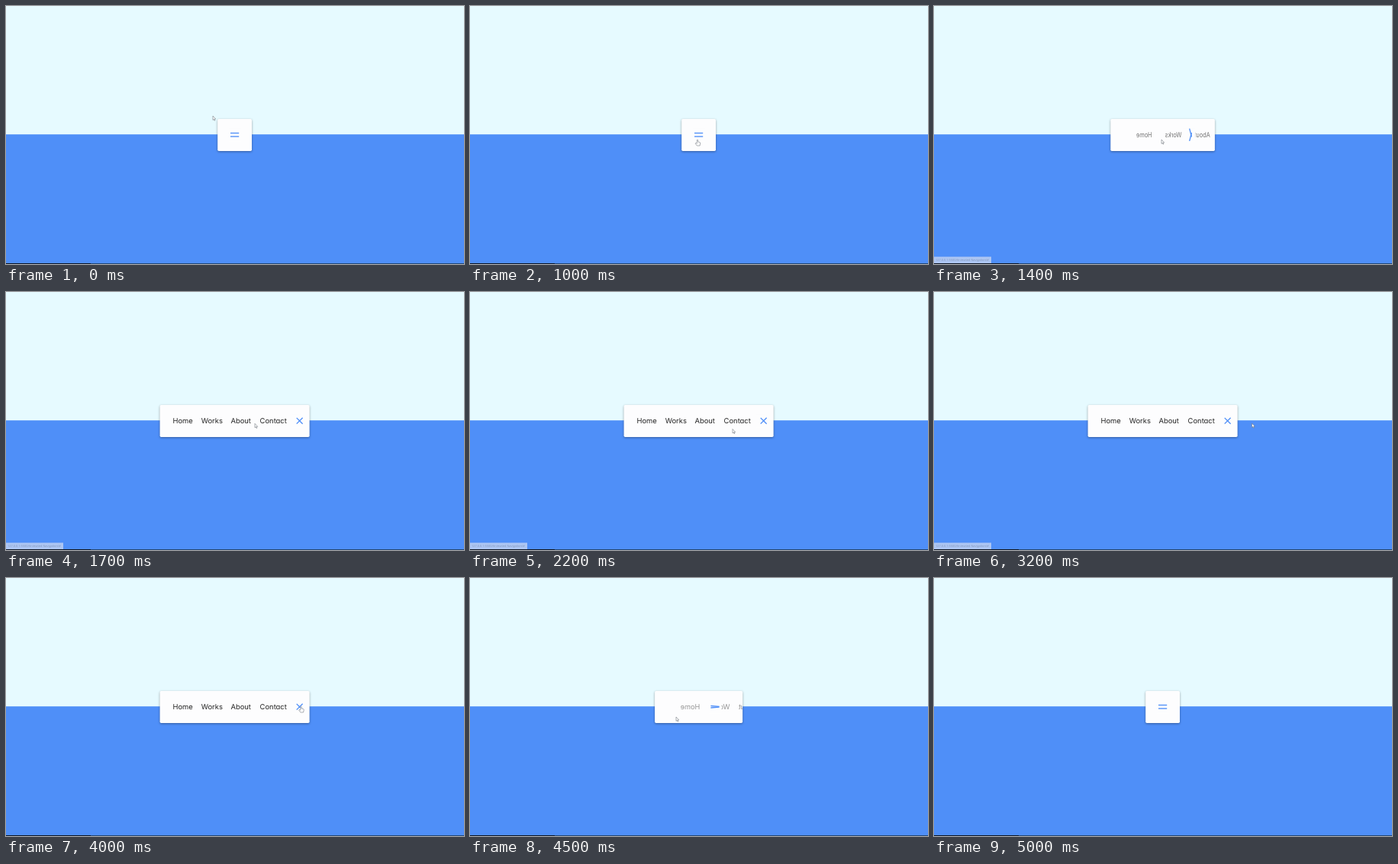
Recreate the animation shown at these times as an HTML page. Size 600x338 px, loop 6400 ms.

```html
<!DOCTYPE html>
<html lang="en">
<head>
<meta charset="utf-8">
<title>Animated navigation</title>
<style>
  html, body { margin: 0; width: 100%; height: 100%; overflow: hidden; background: #4f8ff8; }
  svg { display: block; width: 100vw; height: 100vh; }
  #panel { filter: drop-shadow(0 1.1px 1.4px rgba(0, 0, 0, .36)); }
  text { text-rendering: geometricPrecision; }
  #links text {
    font: 9.4px Inter, "Open Sans", sans-serif;
    font-feature-settings: "cv11";
    text-anchor: middle;
    fill: #222;
  }
  #status text { font: 3.9px "Open Sans", sans-serif; fill: #7f94b8; }
  #cursor path { fill: #fff; stroke: #6a6f78; stroke-width: .55; stroke-linejoin: round; }
</style>
</head>
<body>
<svg viewBox="0 0 600 338">
  <defs><clipPath id="clip"><rect id="clipBox" y="148" height="42" rx="1.7"/></clipPath></defs>
  <rect width="600" height="338" fill="#e6faff"/>
  <rect y="168.2" width="600" height="169.8" fill="#4f8ff8"/>
  <rect y="337" width="600" height="1" fill="#234673"/>
  <rect y="337" width="111" height="1" fill="#0d1420"/>
  <g id="status">
    <rect y="328.5" width="75" height="8.5" fill="#adc6f3"/>
    <text x="2" y="334.3">127.0.0.1:5500/Animated Navigation/#</text>
  </g>
  <rect id="panel" y="148" height="42" rx="1.7" fill="#fdfdfe"/>
  <g clip-path="url(#clip)">
    <g id="links"></g>
    <rect id="iconBack" y="160.3" height="16.9" fill="#fdfdfe"/>
    <rect class="line" x="-5.6" y="-.67" width="11.2" height="1.34" fill="#4f8ff8"/>
    <rect class="line" x="-5.6" y="-.67" width="11.2" height="1.34" fill="#4f8ff8"/>
  </g>
  <g id="cursor">
    <path id="arrow" d="M0 0V5.4L1.3 4.3L2.1 6.2L2.9 5.8L2.1 4H3.7Z"/>
    <path id="hand" d="M-.7 .6Q0 -.3 .7 .6V3L3 3.5Q3.9 3.8 3.7 5L3.1 8H-.7L-2.8 5.2Q-2.7 4.2 -1.7 4.6L-.7 5.2Z"/>
  </g>
</svg>
<script>
const LOOP = 6400, STEP = 100;
const OPEN_AT = 1060, CLOSE_AT = 4200, TOGGLE = 560;
const HOVER_DELAY = 200;        // the pointer changes shape after resting this long
const UNIT = 0.56;              // stage pixels per page pixel
const MID_X = 299.6, MID_Y = 168.75;
const $ = id => document.getElementById(id);
const set = (el, attrs) => { for (const k in attrs) el.setAttribute(k, attrs[k]); };
const show = (el, on) => el.setAttribute('visibility', on ? 'visible' : 'hidden');
const clamp = v => Math.min(1, Math.max(0, v));

// Each label's centre, measured from the list's left edge
const links = Object.entries({ Home: 18.8, Works: 57, About: 94.9, Contact: 137.4 }).map(([label, x]) => {
  const el = document.createElementNS('http://www.w3.org/2000/svg', 'text');
  el.textContent = label;
  $('links').append(el);
  return { el, x };
});
const lines = [...document.querySelectorAll('.line')];

// Straight pointer strokes, with an optional rest at the end of each
const stops = [
  { at: 0, x: 271, y: 144 },
  { at: 200, x: 247, y: 140 },
  { at: 500, x: 298, y: 175, rest: 1100 },
  { at: 1900, x: 382, y: 167 },
  { at: 2200, x: 344, y: 179.5 },
  { at: 2700, x: 235, y: 168 },
  { at: 3200, x: 416.5, y: 172 },
  { at: 3600, x: 386.5, y: 168, rest: 500 },
  { at: 4500, x: 270, y: 182 },
  { at: 4900, x: 2, y: 234 }
];

function pointerAt(t) {
  const i = Math.max(0, stops.findLastIndex(s => s.at <= t));
  const a = stops[i], b = stops[i + 1] || a;
  const leave = a.at + (a.rest || 0);
  const u = b === a ? 0 : clamp((t - leave) / (b.at - leave));
  return { x: a.x + (b.x - a.x) * u, y: a.y + (b.y - a.y) * u };
}

const openness = t => clamp((t - OPEN_AT) / TOGGLE) - clamp((t - CLOSE_AT) / TOGGLE);

// Centred flex row in page pixels: a growing list followed by the icon
function layout(p) {
  const width = 80 + 270 * p, content = width - 40;
  const list = Math.min(p * content, 288);
  const icon = Math.min(30, content - list);
  const left = MID_X - width / 2 * UNIT;
  const listX = left + (20 + (content - list - icon) / 2) * UNIT;
  return { left, width: width * UNIT, listX, iconX: listX + list * UNIT, iconWidth: icon * UNIT };
}

function drawNav(p, box) {
  for (const id of ['panel', 'clipBox']) set($(id), { x: box.left, width: box.width });
  const flip = Math.cos(2 * Math.PI * p);
  for (const { el, x } of links) {
    set(el, { transform: `translate(${box.listX + x} 172) scale(${flip} 1)`, opacity: p });
  }
  set($('iconBack'), { x: box.iconX, width: box.iconWidth });
  lines.forEach((el, i) => {
    const side = i ? 1 : -1;
    set(el, {
      transform: `translate(${box.iconX + 15 * UNIT} ${MID_Y + side * 4 * UNIT})` +
        `rotate(${side * 765 * p}) translate(0 ${-side * 5.5 * UNIT * p})`
    });
  });
}

function isHovering({ x, y }, box) {
  const onIcon = Math.abs(x - box.iconX - 15 * UNIT) < 9 && Math.abs(y - MID_Y) < 9;
  const onLinks = x > box.listX && x < box.iconX && Math.abs(y - 167) < 3;
  return onIcon || onLinks;
}

function render(time) {
  const t = Math.floor(time % LOOP / STEP) * STEP;
  const p = openness(t), box = layout(p);
  drawNav(p, box);
  show($('status'), t >= 1200 && t < 3500);

  const { x, y } = pointerAt(t), visible = t < 5000;
  const hand = p % 1 === 0 && isHovering(pointerAt(t - HOVER_DELAY), box);
  set($('cursor'), { transform: `translate(${x} ${y})` });
  show($('arrow'), visible && !hand);
  show($('hand'), visible && hand);
}

const start = performance.now();
function tick() {
  render(performance.now() - start);
  requestAnimationFrame(tick);
}
tick();
</script>
</body>
</html>
```
